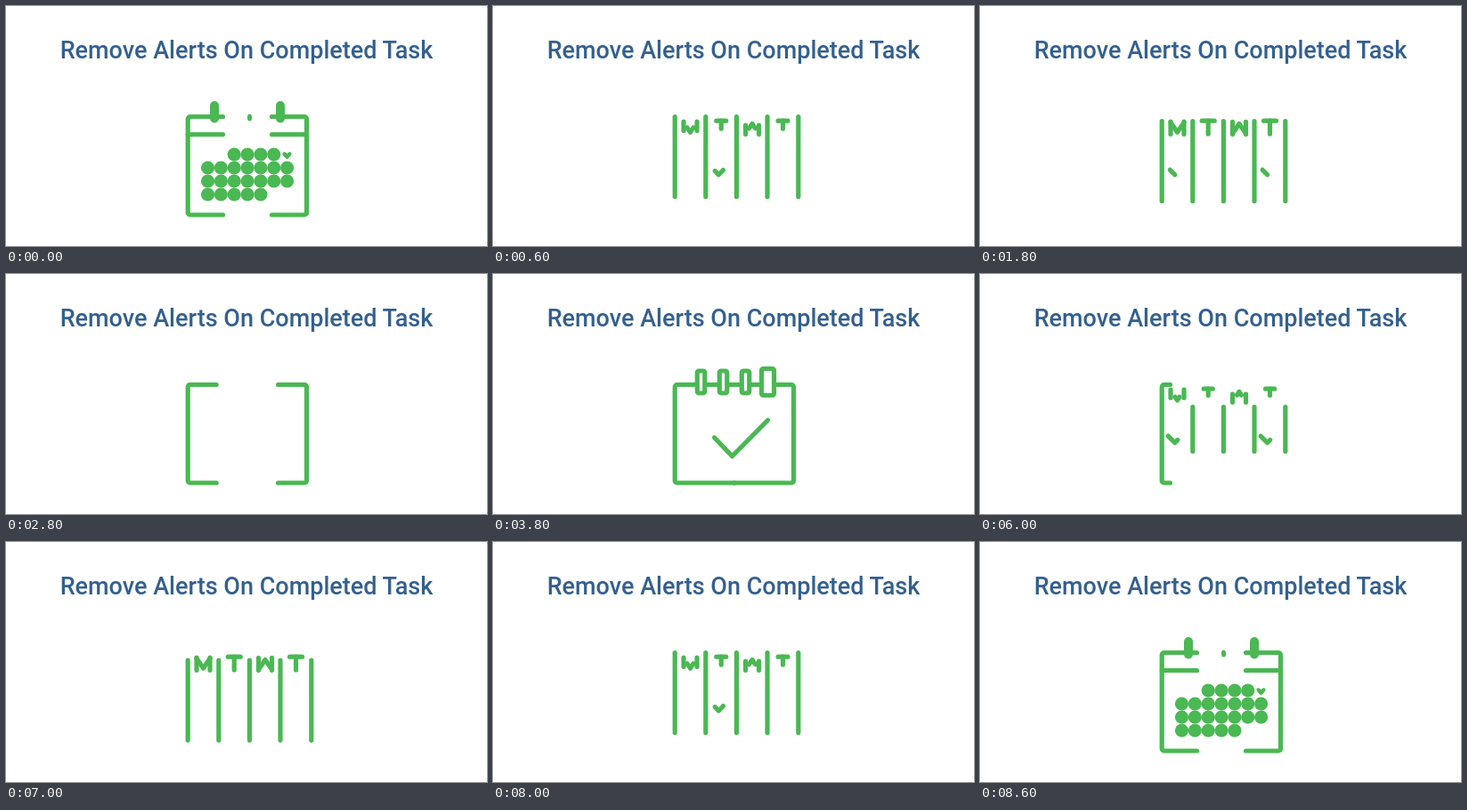
Recreate the animation shown at these times as an HTML page with a canvas. Size 540 by 270 pixels, loop 8800 ms.

```html
<!DOCTYPE html>
<html lang="en">
<head>
<meta charset="utf-8">
<title>Remove Alerts</title>
<style>
html, body { margin: 0; width: 100%; height: 100%; overflow: hidden; background: #fff; }
canvas { display: block; position: absolute; left: 0; top: 0; width: 540px; height: 270px; }
h1 {
  position: absolute; left: 0; top: 32.5px; width: 540px; margin: 0;
  font: 500 27px/34px Roboto, Inter, sans-serif;
  text-align: center; white-space: nowrap; color: #33608f;
}
</style>
</head>
<body>
<canvas id="stage" width="540" height="270"></canvas>
<h1>Remove Alerts On Completed Task</h1>
<script>
const canvas = document.getElementById('stage');
const ctx = canvas.getContext('2d');
const dpr = window.devicePixelRatio || 1;
canvas.width = 540 * dpr;
canvas.height = 270 * dpr;

const GREEN = '#4ab853';
const STEP = 200, STEPS = 44, HALF = STEPS / 2;
const LEFT = 204.2, RIGHT = 337.5, TOP = 124.5, BOTTOM = 235;
const COLS = [204.2, 238.8, 273.4, 308, 342.8];
const RINGS = [233.5, 258.5, 283.5, 308.5];
const WEIGHT = 5.2;

// Polyline, optionally trimmed to the part between fractions s and e
function line(pts, s = 0, e = 1) {
  if (e <= s) return;
  let len = 0;
  ctx.beginPath();
  pts.forEach(([x, y], i) => {
    ctx.lineTo(x, y);
    if (i) len += Math.hypot(x - pts[i - 1][0], y - pts[i - 1][1]);
  });
  if (s > 0 || e < 1) {
    ctx.setLineDash([(e - s) * len, 2 * len]);
    ctx.lineDashOffset = -s * len;
  }
  ctx.stroke();
  ctx.setLineDash([]);
}

function disc(x, y, rx, ry = rx) {
  ctx.beginPath();
  ctx.ellipse(x, y, rx, ry, 0, 0, 2 * Math.PI);
  ctx.fill();
}

function bracket(edge, reach, header) {
  ctx.beginPath();
  ctx.moveTo(reach, TOP);
  ctx.arcTo(edge, TOP, edge, BOTTOM, 2.5);
  ctx.arcTo(edge, BOTTOM, reach, BOTTOM, 2.5);
  ctx.lineTo(reach, BOTTOM);
  ctx.stroke();
  if (header) line([[edge, 144.5], [reach, 144.5]]);
}

function heart(x, y, k) {
  ctx.save();
  ctx.translate(x, y);
  ctx.scale(k, k);
  ctx.beginPath();
  ctx.moveTo(0, 4.5);
  ctx.bezierCurveTo(-9, -2, -4, -6.5, 0, -1.8);
  ctx.bezierCurveTo(4, -6.5, 9, -2, 0, 4.5);
  ctx.fill();
  ctx.restore();
}

function month(step) {
  const open = step === 0;
  bracket(LEFT, open ? 243.5 : 219.5, true);
  bracket(RIGHT, open ? 298.5 : 323, true);
  const k = open ? 1 : 0.45;
  [[2, 5], [0, 6], [0, 6], [0, 4]].forEach(([a, b], row) => {
    for (let i = a; i <= b; i++) disc(226.5 + 14.85 * i, 167 + 15 * row, 7.6 * k);
  });
  if (!open) return;
  heart(315.5, 168, 1);
  disc(273.5, 125.5, 2.6, 4);
  ctx.lineWidth = 10;
  for (const x of [234, 308]) line([[x, 112], [x, 126.5]]);
  ctx.lineWidth = WEIGHT;
}

function letterM(x, p, flip) {
  const y = v => flip ? 274.5 - v : v;
  const stem = 130.2 + 14 * (0.3 + 0.7 * p);
  for (const d of [-7.5, 7.5]) line([[x + d, y(130.2)], [x + d, y(stem)]]);
  const v = Math.max(0, (p - 0.25) * 4 / 3);
  if (v) line([[x - 7.5 * v, y(142 - 11 * v)], [x, y(142)], [x + 7.5 * v, y(142 - 11 * v)]]);
}

function letterT(x, p) {
  const w = 3 + 4 * p;
  line([[x - w, 129.2], [x + w, 129.2]]);
  line([[x, 129.2], [x, 129.2 + 14.8 * p]]);
}

function tick(col, s, e) {
  const x = COLS[col] + 14.6;
  line([[x - 7.5, 182.3], [x, 189.8], [x + 14.5, 175]], s, e);
}

function week(step) {
  const mid = 174.5 - 5 * Math.cos((step - 3) * Math.PI / 4);
  const half = step === 2 ? 30 : step === 13 ? 25 : 45;
  COLS.forEach((x, i) => {
    if (step === 13 && i === 0) bracket(LEFT, 213.5);
    else line([[x, mid - half], [x, mid + half]]);
  });
  const p = step === 2 ? 0.2 : step === 3 ? 0.6 : step === 13 ? 0.5 : 1;
  letterM(221.5, p);
  letterT(256.2, p);
  letterM(291, p, true);
  letterT(325.5, p);

  if (step === 3) tick(1, 0.15, 0.57);
  else if (step > 3 && step < 7) tick(1, 0, 1);
  else if (step === 7) tick(1, 0.5, 1);
  const outer = step === 9 ? [0.09, 0.34] : step === 13 ? [0, 0.48] : [0, 1];
  if (step >= 9) for (const col of [0, 3]) tick(col, ...outer);
}

function ring(x, k, big) {
  const w = big ? 14 : 8.5 * k, h = big ? 30 : 25 * k;
  ctx.beginPath();
  ctx.roundRect(x - w / 2, 121.5 - h / 2, w, h, 2);
  ctx.fillStyle = '#fff';
  ctx.fill();
  ctx.stroke();
  ctx.fillStyle = GREEN;
}

function done(step) {
  const reach = step === 14 ? 32 : 66.8;
  bracket(LEFT, LEFT + reach);
  bracket(RIGHT, RIGHT - reach);
  const pulse = step < 17 ? -1 : step === 20 ? 1 : step === 21 ? 0 : 3;
  const grow = Math.min(1, (step - 14) / 2);
  if (grow) RINGS.forEach((x, i) => ring(x, grow, i === pulse));
  line([[248.5, 184], [268.5, 205], [308.5, 164.5]], 0, Math.min(1, (step - 14) / 3));
}

function cross() {
  ctx.fillStyle = '#f9f9f9';
  ctx.fillRect(234, 148, 72, 65);
  ctx.strokeStyle = '#0aa00a';
  ctx.lineWidth = 3;
  line([[252, 164.5], [288, 198.5]]);
  line([[288, 165], [252, 198.5]]);
}

function draw(now) {
  const n = Math.floor(now / STEP) % STEPS;
  const step = n < HALF ? n : STEPS - 1 - n;   // second half runs backwards
  ctx.setTransform(dpr, 0, 0, dpr, 0, 0);
  ctx.fillStyle = '#fff';
  ctx.fillRect(0, 0, 540, 270);
  ctx.fillStyle = ctx.strokeStyle = GREEN;
  ctx.lineWidth = WEIGHT;
  ctx.lineCap = ctx.lineJoin = 'round';
  if (step < 2) month(step);
  else if (step < 14) week(step);
  else done(step);
  if (n >= HALF && n <= 27) cross();
}

const start = performance.now();
function loop() {
  draw(performance.now() - start);
  requestAnimationFrame(loop);
}
loop();
</script>
</body>
</html>
```
